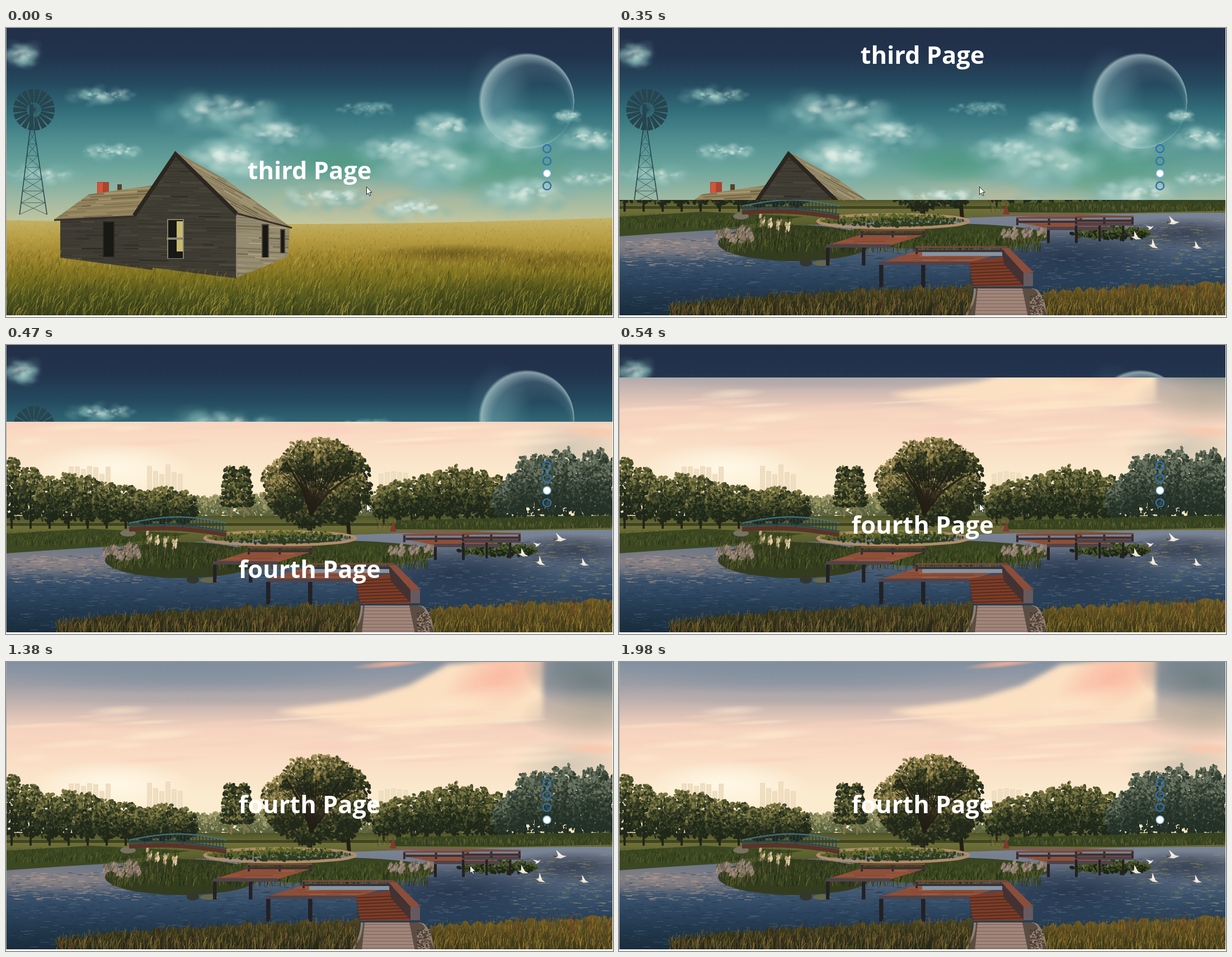
These frames come from a looping animation (1085 px wide and 516 px high, 2350 ms). An HTML page with a canvas:

```html
<!DOCTYPE html>
<html lang="en">
<head>
<meta charset="utf-8">
<title>Page scroll</title>
<style>
html, body { margin: 0; width: 100%; height: 100%; overflow: hidden; background: #fff; }
canvas { display: block; width: 1085px; height: 516px; }
</style>
</head>
<body>
<canvas id="stage" width="1085" height="516"></canvas>
<script>
const W = 1085, H = 516, PAGE = 513, LOOP = 2350;
const ctx = document.getElementById('stage').getContext('2d');
let g, seed;

const clamp = (v, lo = 0, hi = 1) => Math.max(lo, Math.min(hi, v));
const rnd = (a = 1, b = 0) => {
  seed = (seed * 1664525 + 1013904223) >>> 0;
  return b + (a - b) * seed / 4294967296;
};
const pick = list => list[Math.floor(rnd(list.length))];
const repeat = (n, fn) => { for (let i = 0; i < n; i++) fn(i, i / n); };

function makeScene(paint, start) {
  const cv = document.createElement('canvas');
  cv.width = W; cv.height = H;
  g = cv.getContext('2d');
  seed = start;
  paint();
  return cv;
}
function trace(p) {
  g.beginPath();
  for (let i = 0; i < p.length; i += 2) g.lineTo(p[i], p[i + 1]);
}
function poly(fill, ...p) {
  trace(p);
  g.fillStyle = fill;
  g.fill();
}
function line(color, width, ...p) {
  trace(p);
  g.strokeStyle = color;
  g.lineWidth = width;
  g.stroke();
}
function rect(fill, x, y, w, h) { g.fillStyle = fill; g.fillRect(x, y, w, h); }
function oval(fill, x, y, rx, ry, turn = 0) {
  g.beginPath();
  g.ellipse(x, y, rx, ry, turn, 0, 7);
  g.fillStyle = fill;
  g.fill();
}
// Evenly spaced vertical colours
function ramp(y0, y1, ...colors) {
  const gr = g.createLinearGradient(0, y0, 0, y1);
  colors.forEach((c, i) => gr.addColorStop(i / (colors.length - 1), c));
  return gr;
}
function below(fill, x0, x1, top) {
  const p = [x0, H];
  for (let x = x0; x < x1; x += 6) p.push(x, top(x));
  poly(fill, ...p, x1, top(x1), x1, H);
}
function soft(rgb, a, x, y, rx, ry, turn = 0) {
  g.save();
  g.translate(x, y);
  g.rotate(turn);
  g.scale(rx, ry);
  const gr = g.createRadialGradient(0, 0, 0, 0, 0, 1);
  gr.addColorStop(0, `rgba(${rgb},${a})`);
  gr.addColorStop(.45, `rgba(${rgb},${a * .65})`);
  gr.addColorStop(1, `rgba(${rgb},0)`);
  g.fillStyle = gr;
  g.fillRect(-1, -1, 2, 2);
  g.restore();
}
function puffs(rgb, a, x, y, rx, ry, n) {
  repeat(n, () => {
    const q = rnd(6.28), d = Math.sqrt(rnd()), s = ry * rnd(.65, .2);
    soft(rgb, a * rnd(1, .4), x + Math.cos(q) * d * rx, y + Math.sin(q) * d * ry * .8,
      s * 1.6, s, rnd(.5, -.5));
  });
}
// A teal body, a paler middle and a lit crest
function cloud(x, y, rx, ry, light) {
  puffs('125,180,178', .32, x, y, rx, ry, 34);
  puffs('190,220,212', .4 * light, x, y - ry * .15, rx * .85, ry * .7, 34);
  puffs('232,243,235', .55 * light, x + rx * .1, y - ry * .2, rx * .55, ry * .4, 22);
}
// Blades from back to front, longer towards the viewer
function grass(n, x0, x1, top, bottom, colors, len, lean, alpha = .5) {
  g.globalAlpha = alpha;
  repeat(n, (i, k) => {
    const x = rnd(x1, x0), y = top(x) + (bottom - top(x)) * k;
    const l = len * (.3 + k * .7) * rnd(1.1, .5), dx = l * rnd(lean + .3, lean - .3);
    line(pick(colors), .6 + k * .7, x, y, x + dx * .3, y - l * .6, x + dx, y - l);
  });
  g.globalAlpha = 1;
}
// Colours run from the lit upper left to the shaded lower right
function leaves(x, y, rx, ry, pal, size = 2.6) {
  const n = rx * ry * .4;
  repeat(n, (i, k) => {
    const q = rnd(6.28), d = Math.sqrt(rnd()) * rnd(1.08, .9);
    const dx = Math.cos(q) * d, dy = Math.sin(q) * d, s = size * (1.9 - 1.2 * k) * rnd(1, .5);
    const tone = Math.floor((dy * .45 + dx * .2 + .65 + rnd(.35, -.35)) * pal.length);
    oval(pal[clamp(tone, 0, pal.length - 1)], x + dx * rx, y + dy * ry, s * 1.2, s * .8, rnd(3));
  });
}
function tree(x, top, base, rx, pal) {
  const ry = (base - top) * .43;
  rect('#25261a', x - 2, top + ry, 4, base - top - ry);
  leaves(x, top + ry, rx, ry, pal);
}
function ripples(n, x0, x1, y0, y1, colors, alpha) {
  g.globalAlpha = alpha;
  repeat(n, () => rect(pick(colors), rnd(x1, x0), rnd(y1, y0), rnd(16, 3), 1));
  g.globalAlpha = 1;
}

function windmill() {
  const c = '#27454f', left = y => 45 - (y - 165) * .123, right = y => 48 + (y - 165) * .15;
  for (let y = 165; y < 320; y += 21) {
    line(c, 1.6, left(y), y, left(y + 21), y + 21);
    line(c, 1.6, right(y), y, right(y + 21), y + 21);
    line(c, .7, left(y), y, right(y), y, left(y + 21), y + 21);
    line(c, .7, left(y), y, right(y + 21), y + 21);
  }
  repeat(18, i => {
    g.save();
    g.translate(50, 146);
    g.rotate(i * Math.PI / 9);
    poly(c, 13, -2, 37, -5, 37, 5, 13, 2);
    line(c, .8, 0, 0, 14, 0);
    g.restore();
  });
  rect(c, 42, 136, 7, 34);
}

function planks(fill, tones, gap, slope, ...shape) {
  const xs = shape.filter((v, i) => i % 2 === 0), ys = shape.filter((v, i) => i % 2);
  const x0 = Math.min(...xs), x1 = Math.max(...xs), y1 = Math.max(...ys);
  g.save();
  poly(fill, ...shape);
  g.clip();
  for (let y = Math.min(...ys) - (x1 - x0) * Math.max(slope, 0); y < y1 + 20; y += gap)
    for (let x = x0; x < x1;) {
      const end = x + rnd(60, 14);
      g.globalAlpha = rnd(.75, .15);
      line(pick(tones), rnd(gap * .6, .7), x, y + (x - x0) * slope, end, y + (end - x0) * slope);
      x = end;
    }
  g.restore();
}
function opening(x, y, w, h, frame) {
  rect(frame, x, y, w, h);
  rect('#181815', x + 2, y + 2, w - 4, h - 3);
}
function house() {
  const dark = ['#2a2822', '#37342b', '#555040', '#332f28'], shingle = ['#57503b', '#c5b686', '#6c6146', '#b0a278'];
  rect('#a8452f', 163, 275, 21, 22);
  rect('#d2553a', 164, 276, 9, 20);
  rect('#54412f', 199, 279, 8, 11);
  planks('#3f3c34', dark, 6, 0, 97, 342, 262, 322, 262, 432, 97, 410);
  planks('#403d34', dark, 5, .02, 304, 228, 412, 332, 412, 447, 238, 425, 234, 330);
  planks('#92835c', shingle, 5, -.06, 86, 342, 148, 297, 262, 281, 230, 335);
  planks('#938a70', shingle, 5, .04, 412, 332, 507, 358, 504, 408, 412, 446);
  planks('#988c6b', shingle, 4, .55, 304, 221, 392, 270, 511, 357, 413, 330);
  line('#2b261f', 7, 229, 335, 303, 225, 412, 331);
  line('#35302a', 3, 86, 343, 230, 336);
  line('#35302a', 3, 412, 331, 511, 357);
  line('#8a8170', 2, 412, 336, 412, 446);
  opening(173, 345, 21, 64, '#2b2921');
  opening(288, 341, 30, 71, '#85816f');
  opening(457, 350, 13, 60, '#4b4536');
  opening(490, 359, 9, 43, '#4b4536');
  rect('#c6b970', 305, 345, 11, 54);
  rect('#8b8775', 287, 374, 30, 4);
}

function moon() {
  const gr = g.createRadialGradient(960, 149, 49, 930, 130, 86);
  gr.addColorStop(0, 'rgba(150,190,195,0)');
  gr.addColorStop(.6, 'rgba(140,182,188,.2)');
  gr.addColorStop(.92, 'rgba(185,210,210,.68)');
  gr.addColorStop(1, 'rgba(160,195,200,0)');
  soft('120,170,180', .3, 880, 130, 60, 100);
  oval(gr, 930, 130, 86, 86);
}

function fieldScene() {
  rect(ramp(0, 350, '#222f48', '#22334d', '#254a5f', '#33707c', '#4f8e91', '#6ca59c', '#9ab8a3', '#c6c79e'), 0, 0, W, 350);
  soft('70,150,118', .6, 860, 245, 170, 65);
  soft('70,150,118', .6, 600, 240, 110, 40);
  soft('190,187,155', .7, 660, 305, 200, 40);
  moon();
  const banks = [
    [28, 50, 25, 24, .3], [175, 122, 62, 18, .6], [190, 222, 60, 18, .9], [60, 265, 70, 24, .5],
    [385, 150, 95, 38, .6], [480, 192, 80, 34, .65], [395, 240, 70, 45, .9], [645, 145, 55, 14, .4],
    [690, 220, 70, 30, .75], [780, 180, 55, 30, .75], [760, 245, 95, 55, .6], [905, 195, 55, 45, .5],
    [1005, 158, 24, 14, .7], [1045, 200, 55, 26, .9], [570, 305, 85, 28, .95], [725, 325, 70, 24, 1],
    [930, 300, 80, 36, .75], [1045, 272, 55, 20, .7]];
  for (const b of banks) cloud(...b);

  const top = x => 343 + 9 * Math.sin(Math.PI * x / W) - 4 * x / W;
  below(ramp(340, 516, '#c4b368', '#b79e44', '#9d842b', '#7d711f', '#575b20', '#363d1b'), 0, W, top);
  soft('78,62,18', .55, 800, 402, 150, 17);
  soft('78,62,18', .4, 980, 415, 140, 20);
  soft('42,48,20', .6, 950, 500, 320, 65);
  soft('50,58,22', .5, 170, 500, 260, 55);
  grass(2500, 0, W, top, 430, ['#dcc978', '#a18a32', '#6d5c20', '#c9b04c'], 9, .25, .35);
  house();
  const front = x => x < 98 || x > 506 ? 400 : 414 + Math.min((x - 98) * .09, (506 - x) * .35);
  grass(4300, 0, W, front, 525, ['#c5b14a', '#958a32', '#454c1b', '#292f15', '#716f25', '#4f571d'], 25, .35, .52);
  windmill();
}

function skyline(x0, x1) {
  for (let x = x0; x < x1; x += 11) {
    const y = rnd(232, 211);
    rect('#eedcbf', x, y, 9, 270 - y);
    repeat(8, k => rect('#f7e7cb', x + 2, y + 4 + k * 4, 5, 1));
  }
}
function bigTree() {
  const bark = '#241f16';
  line(bark, 8, 543, 337, 545, 295, 520, 245);
  line(bark, 7, 614, 347, 608, 275, 632, 235);
  repeat(11, i => {
    const q = i * 2.4, d = i ? 1 : 0;
    leaves(558 + 62 * d * Math.cos(q), 248 + 45 * d * Math.sin(q), 38, 36,
      ['#a39058', '#746a3c', '#4a4d29', '#303720', '#22291b']);
  });
  g.globalAlpha = .85;
  repeat(24, (i, k) => line(bark, rnd(3, 1), 545, 305, 530 + k * 50, 262, 495 + k * 130, rnd(240, 200)));
  g.globalAlpha = 1;
}
function park() {
  const far = ['#a09b6a', '#7a7d50', '#5c6440'], oak = ['#7d7743', '#4e532d', '#313922', '#20281a'],
    cool = ['#6b7562', '#465342', '#2f3c30', '#243127'];
  for (let x = 150; x < 900; x += 38) leaves(x, 288, 28, 18 + rnd(8), far);
  rect(ramp(300, 370, '#454a24', '#6f7038', '#5b602f', '#3f4a24'), 0, 305, W, 65);
  for (let x = 10; x < 350; x += 34) tree(x, 196 + 67 * Math.sqrt(x / 350) + rnd(10, -8), 328, 27, oak);
  for (let x = 675; x < 900; x += 25) tree(x, 212 + Math.abs(x - 805) * .26 + rnd(8), 322, 21, oak);
  for (let x = 890; x < W; x += 19) tree(x, 182 + 40 * clamp((945 - x) / 55) + rnd(25), 322, 20, cool);
  for (const x of [402, 425]) {
    rect('#86724a', x - 1, 235, 3, 73);
    repeat(7, i => leaves(x, 222 + i * 10, 10 + i * 2, 6, oak));
  }
  bigTree();
  rect('rgba(28,36,18,.55)', 0, 318, W, 5);
}

function water() {
  const shore = x => 371 - 41 * Math.sin(Math.PI / 2 * x / W);
  below(ramp(325, 513, '#7a8799', '#757d8e', '#56657a', '#3a526c', '#2b435c', '#20364a', '#1a2d3e'), 0, W, shore);
  soft('170,150,140', .65, 80, 390, 230, 28);
  soft('34,50,72', .8, 800, 410, 190, 55);
  soft('34,46,62', .7, 1010, 365, 130, 28);
  ripples(1100, 0, 640, 375, 510, ['#15293d', '#6d7c90', '#39536c', '#20384f'], .42);
  ripples(180, 0, 230, 375, 425, ['#d7ad8d', '#b69c93'], .5);
  ripples(500, 700, W, 345, 470, ['#8795a6', '#22364f', '#56697f'], .38);
  ripples(120, 900, W, 340, 445, ['#a89b68', '#75794f'], .65);
}

function pampas(x, y, h, lean, tones) {
  line('#6f6546', 1, x, y, x + lean, y - h);
  repeat(14, () => oval(pick(tones), x + lean + rnd(4, -4), y - h + rnd(h * .4, -5), 1.6, 3.5, .3));
}
function island() {
  const greens = ['#6f7232', '#2c3a1b', '#4d5a26', '#3a471d', '#1c2616'];
  const dull = ['#8b7a6c', '#6a5f52', '#a08d7c'], bright = ['#e3cda6', '#c8ad82', '#8e8458'];
  poly('#3c4822', 0, 337, 150, 328, 330, 337, 170, 360, 0, 372);
  grass(900, 0, 310, x => 333, 360, greens, 11, .2);
  oval('#343c1f', 315, 384, 138, 32);
  oval('#3a4521', 580, 372, 190, 23);
  grass(2200, 190, 755, x => 352 + Math.abs(x - 390) * .03, 402, greens, 15, .15, .65);
  g.beginPath();
  g.ellipse(490, 345, 135, 12, 0, 0, 7);
  g.strokeStyle = '#b08d6b';
  g.lineWidth = 5;
  g.stroke();
  leaves(490, 343, 122, 11, ['#7c7a36', '#55602a', '#2d3b20'], 2);
  poly('#364320', 700, 313, W, 304, W, 326, 900, 330, 690, 329);
  grass(700, 660, W, x => 311, 329, ['#5f6531', '#28361d', '#85793f'], 9, .1);
  leaves(880, 365, 68, 12, greens);
  repeat(14, (i, k) => pampas(182 + k * 60, rnd(395, 380), rnd(28, 14), rnd(9, -5), dull));
  repeat(10, (i, k) => pampas(690 + k * 70, 383, rnd(22, 12), rnd(8, -5), dull));
  repeat(4, i => pampas(258 + i * 13, 376, 38 - i * 5, i * 2 - 2, bright));
  oval('#33372d', 334, 419, 11, 7);
  oval('#65664d', 363, 420, 16, 5);
  oval('#777261', 218, 336, 14, 6);
}
function bridge() {
  const arch = (x, rise) => 318 - rise * Math.sin(Math.PI * (x - 220) / 174);
  for (let x = 220; x < 394; x += 6) {
    const low = arch(x, 6) + 5 + (x - 220) * .06;
    rect('#5a3426', x, low + 2, 6, 8);
    line('#263f49', 1.5, x, arch(x, 11), x, low);
    line('#45727a', 2.5, x, arch(x, 11), x + 6, arch(x + 6, 11));
    line('#2c4d57', 3, x, low, x + 6, low + .3);
  }
}
// A slanted wooden platform on evenly spaced posts
function deck(x, y, w, dx, dy, gap, leg) {
  for (let px = x; px < x + w - 20; px += gap) rect('#232125', px, y, gap * .1, leg);
  planks('#91513a', ['#6d3a29', '#a9664a', '#7f452f'], 4, 0, x, y, x + dx, y - dy, x + dx + w, y - dy, x + w, y);
  line('#4f434a', 6, x, y + 1, x + w, y + 1);
  for (let k = 0; k < 3; k++) rect('#322a2d', x + dx + w * k * .48, y - dy - 8, 4, 13);
  line('#3d3235', 4, x + dx, y - dy - 1, x + dx + w, y - dy - 1);
  line('#7c4838', 3, x + dx, y - dy - 8, x + dx + w, y - dy - 8);
}
function decks() {
  poly('#7a5f50', 645, 332, 790, 331, 920, 336, 790, 340);
  deck(765, 357, 118, -55, 10, 50, 27);
  deck(815, 349, 105, 0, 4, 42, 32);
  deck(370, 388, 115, 62, 19, 64, 36);
  deck(465, 419, 163, 65, 20, 75, 44);
  rect('#8793a0', 542, 400, 143, 7);
  poly('#7c3c27', 626, 417, 688, 408, 726, 439, 724, 462, 633, 462);
  repeat(8, i => line('#4b281e', 1.5, 627, 421 + i * 5.5, 690 + i * 5, 418 + i * 5.5));
  poly('#8d4d3b', 684, 393, 697, 393, 741, 436, 724, 438);
  poly('#443132', 684, 395, 724, 438, 724, 462, 688, 421);
  rect('#665a5e', 723, 437, 17, 24);
}
function path() {
  const left = y => 634 - 16 * ((y - 465) / 48) ** 2, right = y => 742 + 26 * Math.sqrt((y - 465) / 48);
  for (let y = 465; y < PAGE; y++) {
    rect('#5b4d43', left(y), y, right(y) - left(y), 1);
    rect(y % 6 ? '#a18579' : '#77635b', 641 - (y - 465) * .1, y, 80 + (y - 465) * .3, 1);
    rect('#8f8072', left(y), y, 4, 1);
    rect('#8f8072', right(y) - 4, y, 4, 1);
  }
  repeat(150, () => oval(pick(['#917c68', '#3d332e', '#a38b75']), rnd(758, 735), rnd(513, 476), 1.5, 1));
}
function bird(x, y, s, tilt) {
  g.save();
  g.translate(x, y);
  g.rotate(tilt);
  poly('#e9e2d4', -s, 0, 0, -s * .25, s, s * .15, 0, s * .35);
  poly('#f5efe2', -s * .3, 0, -s * .5, -s * 1.2, s * .4, 0);
  poly('#5c4840', -s, 0, -s * 1.1, -s * .4, -s * .4, 0);
  g.restore();
}

function eveningSky() {
  rect(ramp(0, 320, '#8391a2', '#9c9ea6', '#cbb8b2', '#f5d3bf', '#fadac3', '#fae3c8', '#fbeccf', '#fbeccf', '#f0dfb8'), 0, 0, W, 320);
  soft('125,140,156', .7, 340, 10, 380, 50);
  soft('172,165,168', .6, 350, 66, 330, 16);
  g.save();
  g.filter = 'blur(5px)';
  poly('#fbe0c2', 480, 88, 640, 66, 720, 42, 790, 4, 960, -10, 960, 100, 700, 130);
  g.restore();
  soft('250,180,158', .85, 885, 25, 110, 55, -.4);
  soft('253,232,200', .8, 800, 85, 120, 30, -.3);
  soft('112,126,130', .95, 1045, 30, 125, 62, .2);
  soft('176,168,150', .75, 1050, 95, 130, 50);
  soft('190,188,172', .6, 1010, 185, 110, 50);
  soft('250,176,150', .9, 690, 3, 75, 7, -.1);
  soft('250,200,170', .9, 1050, 155, 60, 11, .04);
  soft('255,248,230', 1, 190, 220, 150, 45);
  repeat(60, () => soft(pick(['253,236,207', '248,208,190', '250,218,194']), .55,
    rnd(960), rnd(175, 85), rnd(110, 30), rnd(10, 3), -.05));
}

function parkScene() {
  eveningSky();
  skyline(112, 182);
  skyline(252, 316);
  skyline(666, 712);
  park();
  water();
  island();
  bridge();
  decks();
  const left = x => 496 - 36 * Math.pow(clamp((x - 95) / 535), .6) + rnd(5, -5);
  const right = x => 470 - (x - 755) * .045 + rnd(5, -5);
  below(ramp(460, 516, '#4f4722', '#33321b', '#22251a'), 90, 632, left);
  below(ramp(450, 516, '#776026', '#5b4c1f', '#3a361b'), 758, W, right);
  path();
  grass(1700, 90, 628, left, 525, ['#80692f', '#20231a', '#525526', '#30381c', '#a07d3c', '#5a3f25'], 26, .12, .7);
  grass(1500, 762, W, right, 525, ['#98792c', '#69602a', '#3a391b', '#b48d35', '#5c431f', '#2b321a'], 21, .1, .65);
  grass(70, 890, W, x => 460, 490, ['#39452a', '#5a5b2d', '#784329'], 38, .2, .9);
  bird(991, 347, 11, -.2);
  bird(950, 357, 7, -.7);
  bird(924, 374, 10, .15);
  bird(955, 389, 10, .3);
  bird(1033, 391, 9, .1);
  poly('#7c3c2d', 686, 333, 692, 313, 698, 333);
}

const third = makeScene(fieldScene, 31), fourth = makeScene(parkScene, 77);
const SLIDE = { from: 110, time: 550, ticks: [150, 220, 290, 350, 410, 470, 540, 610, 670] };

function page(scene, y0, y1, text, base) {
  if (y1 <= y0) return;
  ctx.save();
  ctx.beginPath();
  ctx.rect(1, y0, W - 2, y1 - y0);
  ctx.clip();
  ctx.drawImage(scene, 0, 0);
  ctx.font = 'bold 43.4px "Open Sans", "Noto Sans", sans-serif';
  ctx.textAlign = 'center';
  ctx.fillStyle = '#fff';
  ctx.fillText(text, 542.5, base);
  ctx.restore();
}
function dots(active) {
  for (let i = 0; i < 4; i++) {
    const on = i === active;
    ctx.beginPath();
    ctx.arc(967, 215.5 + i * 22.1, 7, 0, 7);
    ctx.fillStyle = on ? '#fff' : 'transparent';
    ctx.fill();
    ctx.strokeStyle = on ? '#78aee0' : '#2c72b4';
    ctx.lineWidth = on ? 1.5 : 2.4;
    ctx.stroke();
  }
}
function pointerAt(t) {
  if (t < 1380) return [644, 283];
  if (t >= 1980) return null;
  if (t >= 1920) return [1045, 509];
  const u = Math.min(7, Math.floor((t - 1380) / 64.2)) / 7, k = 1 - Math.pow(1 - u, 1.5);
  return [829 + 216 * k, 363 + 138 * k];
}
function pointer(x, y) {
  ctx.save();
  ctx.translate(x + .5, y + .5);
  ctx.beginPath();
  for (const [px, py] of [[0, 0], [0, 14], [3, 11], [5.5, 16], [7.5, 15], [5.3, 10.2], [9.5, 10]]) ctx.lineTo(px, py);
  ctx.closePath();
  ctx.fillStyle = '#fff';
  ctx.fill();
  ctx.strokeStyle = '#1c2026';
  ctx.lineWidth = 1;
  ctx.stroke();
  ctx.restore();
}
function draw(now) {
  const t = now % LOOP;
  const tick = SLIDE.ticks.filter(v => v <= t).pop() || 0;
  const p = clamp((tick - SLIDE.from) / SLIDE.time);
  const scroll = Math.round(PAGE * (.5 - Math.cos(Math.PI * p) / 2)), edge = PAGE - scroll;
  ctx.fillStyle = '#fff';
  ctx.fillRect(0, 0, W, H);
  ctx.fillStyle = '#a3a8ab';
  ctx.fillRect(0, 0, 1, PAGE);
  page(third, 0, edge, 'third Page', 270 - scroll);
  page(fourth, edge, PAGE, 'fourth Page', 270 + edge + (p < 1 ? 9 : 0));
  dots(p < 1 ? 2 : 3);
  const at = pointerAt(t);
  if (at) pointer(...at);
}
const begin = performance.now();
function frame() {
  draw(performance.now() - begin);
  requestAnimationFrame(frame);
}
frame();
</script>
</body>
</html>
```
